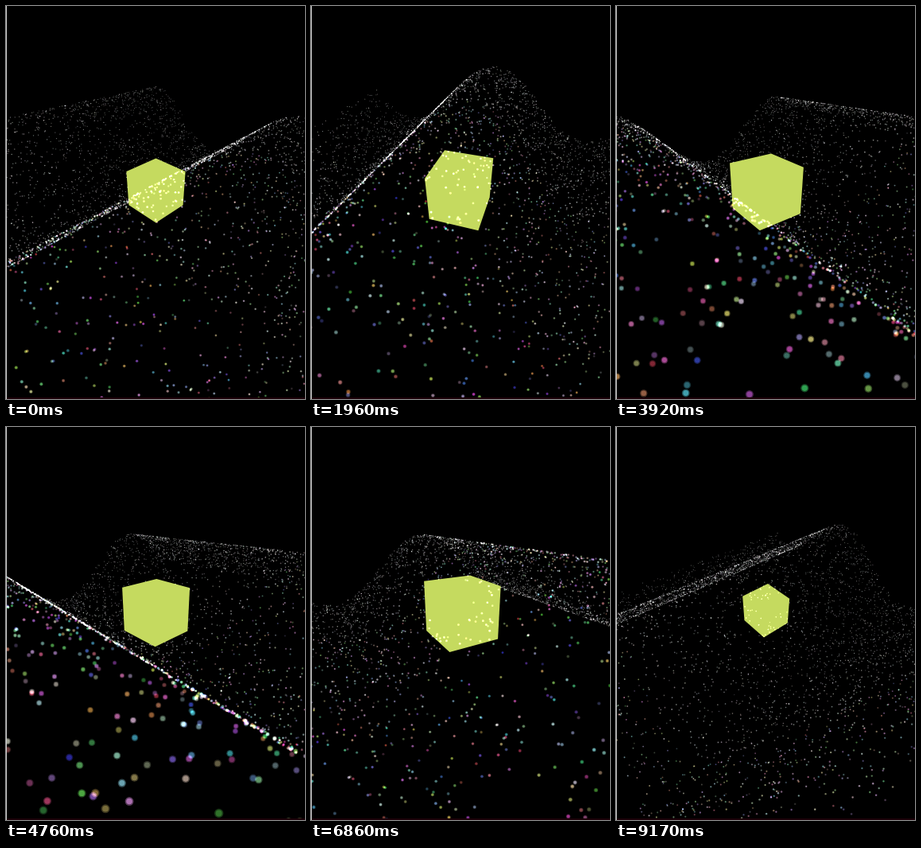
These frames come from a looping animation (376x494 px, 9.24 s). An HTML page with a canvas:

```html
<!DOCTYPE html>
<html lang="en">
<head>
<meta charset="utf-8">
<title>Particle wave and cube</title>
<style>
html, body { margin: 0; width: 100%; height: 100%; overflow: hidden; background: #000; }
canvas { display: block; width: 100%; height: 100%; }
</style>
</head>
<body>
<canvas id="stage" width="376" height="494"></canvas>
<script>
const W = 376, H = 494, LOOP = 9240, STEP = 70;
const CX = 188.5, CY = 230, FOCAL = 322;
const COUNT = 5000, HALF = 5, DOT = 10.4, HEIGHT = 1.05;
const ctx = document.getElementById('stage').getContext('2d');

// Camera path: seconds, x, y, z. It always looks at the cube.
const PATH = [
  [0, 3.8, 3.48, 3.8],
  [1.05, 3.16, 3.46, 3.76],
  [2.8, -0.92, 2.75, 3.68],
  [3.92, -2.67, 2.21, 3.69],
  [5.6, -3.76, 1.93, 3.76],
  [6.72, -2.46, 1.5, 3.85],
  [8.05, 0.81, 3.48, 4],
  [9.17, 4.62, 5.28, 3.88]
];

function slope(i, k) {
  const rate = j => (PATH[j + 1][k] - PATH[j][k]) / (PATH[j + 1][0] - PATH[j][0]);
  const last = PATH.length - 1;
  if (i === 0) return 2 * rate(0) - slope(1, k);
  if (i === last) return 2 * rate(last - 1) - slope(last - 1, k);
  const before = PATH[i][0] - PATH[i - 1][0], after = PATH[i + 1][0] - PATH[i][0];
  return (rate(i - 1) * after + rate(i) * before) / (before + after);
}

function cameraAt(t) {
  let i = 0;
  while (i < PATH.length - 2 && t > PATH[i + 1][0]) i++;
  const a = PATH[i], b = PATH[i + 1], dt = b[0] - a[0];
  const u = (t - a[0]) / dt, v = 1 - u;
  return [1, 2, 3].map(k =>
    a[k] * v * v * (1 + 2 * u) + b[k] * u * u * (3 - 2 * u) +
    dt * u * v * (slope(i, k) * v - slope(i + 1, k) * u));
}

function makeRandom(seed) {
  return () => {
    seed = (seed + 0x6D2B79F5) | 0;
    let n = Math.imul(seed ^ (seed >>> 15), 1 | seed);
    n = (n + Math.imul(n ^ (n >>> 7), 61 | n)) ^ n;
    return ((n ^ (n >>> 14)) >>> 0) / 4294967296;
  };
}

const random = makeRandom(20);
const rgb = c => `rgb(${c.map(v => Math.round(v)).join(',')})`;

const dots = Array.from({ length: COUNT }, () => {
  const x = (random() * 2 - 1) * HALF, z = (random() * 2 - 1) * HALF;
  const color = [0, 0, 0].map(() => 30 + random() * 215);
  const grey = (color[0] + color[1] + color[2]) / 3 + 8;
  const toGrey = m => rgb(color.map(v => v + (grey - v) * m));
  return { x, z, near: toGrey(0.25), mid: toGrey(0.6), far: toGrey(0.9) };
});

const corners = [];
for (const x of [-0.5, 0.5])
  for (const y of [-0.5, 0.5])
    for (const z of [-0.5, 0.5]) corners.push([x, y, z]);

function makeProjector(cam) {
  const d = Math.hypot(...cam);
  const [fx, fy, fz] = cam.map(v => -v / d);
  const h = Math.hypot(fx, fz);
  const rx = -fz / h, rz = fx / h;
  const ux = -rz * fy, uy = rz * fx - rx * fz, uz = rx * fy;
  return (x, y, z) => {
    x -= cam[0]; y -= cam[1]; z -= cam[2];
    const depth = x * fx + y * fy + z * fz;
    const s = FOCAL / depth;
    return [CX + s * (x * rx + z * rz), CY - s * (x * ux + y * uy + z * uz), depth];
  };
}

function hull(points) {
  points.sort((a, b) => a[0] - b[0] || a[1] - b[1]);
  const half = list => {
    const out = [];
    for (const p of list) {
      while (out.length > 1) {
        const a = out[out.length - 2], b = out[out.length - 1];
        if ((b[0] - a[0]) * (p[1] - a[1]) - (b[1] - a[1]) * (p[0] - a[0]) > 0) break;
        out.pop();
      }
      out.push(p);
    }
    return out.slice(0, -1);
  };
  return half(points).concat(half(points.slice().reverse()));
}

// True when the cube stands between the camera and the point.
function hidden(cam, p) {
  let enter = 0, leave = 1;
  for (let k = 0; k < 3; k++) {
    const d = p[k] - cam[k] || 1e-9;
    const a = (-0.5 - cam[k]) / d, b = (0.5 - cam[k]) / d;
    enter = Math.max(enter, Math.min(a, b));
    leave = Math.min(leave, Math.max(a, b));
  }
  return enter < leave;
}

function disc(x, y, r, alpha) {
  ctx.globalAlpha = alpha;
  ctx.beginPath();
  ctx.arc(x, y, r, 0, Math.PI * 2);
  ctx.fill();
}

function drawCube(project) {
  ctx.fillStyle = '#c5da5f';
  ctx.beginPath();
  for (const [x, y] of hull(corners.map(c => project(...c)))) ctx.lineTo(x, y);
  ctx.fill();
}

function drawDots(cam, project, crest) {
  ctx.globalCompositeOperation = 'lighter';
  for (const dot of dots) {
    const y = HEIGHT * Math.cos(dot.x - crest);
    const [sx, sy, depth] = project(dot.x, y, dot.z);
    if (depth < 0.1 || sx < -8 || sx > W + 8 || sy < -8 || sy > H + 8) continue;
    if (hidden(cam, [dot.x, y, dot.z])) continue;
    const r = DOT / depth / 2;
    ctx.fillStyle = r > 1.5 ? dot.near : r > 0.9 ? dot.mid : dot.far;
    if (r > 1.2) {
      disc(sx, sy, r, 0.38);
      disc(sx, sy, r * 0.7, 0.38);
    } else {
      disc(sx, sy, Math.max(r, 0.5), 0.68);
    }
  }
  ctx.globalAlpha = 1;
  ctx.globalCompositeOperation = 'source-over';
}

function draw(ms) {
  const t = Math.floor((ms % LOOP) / STEP) * STEP / 1000;
  const cam = cameraAt(t), project = makeProjector(cam);
  ctx.fillStyle = '#000';
  ctx.fillRect(0, 0, W, H);
  drawCube(project);
  drawDots(cam, project, 1.47 - 0.95 * t);
  ctx.fillStyle = '#1c0209';
  ctx.fillRect(0, H - 2, W, 2);
  ctx.fillStyle = '#d4d4d4';
  ctx.fillRect(0, 0, 1, H);
}

const start = performance.now();
function tick() {
  draw(performance.now() - start);
  requestAnimationFrame(tick);
}
tick();
</script>
</body>
</html>
```
